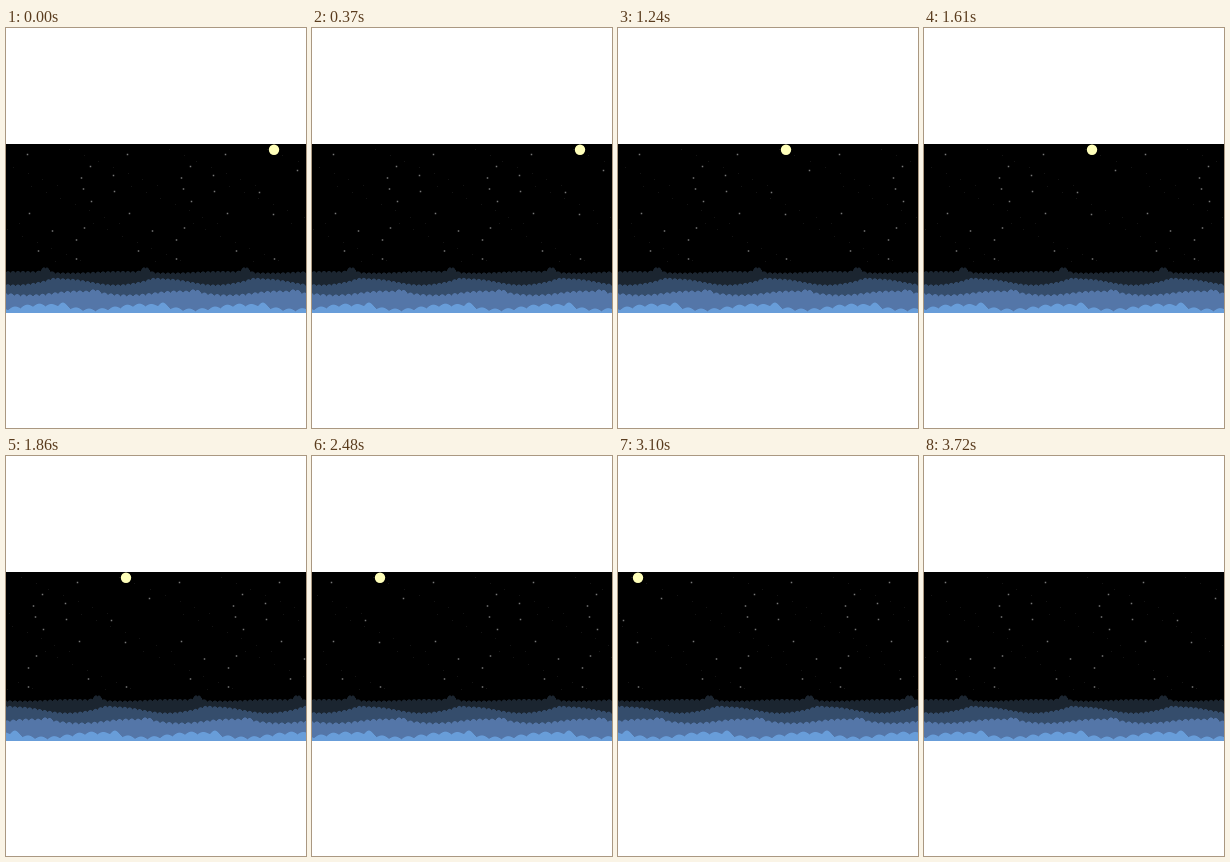
An HTML page with a canvas for the animation above (4340 ms loop, 300 px wide and 400 px high).

```html
<!DOCTYPE html>
<html lang="en">
<head>
<meta charset="utf-8">
<title>Night sky</title>
<style>
html, body { margin: 0; width: 100%; height: 100%; overflow: hidden; background: #fff; }
canvas { display: block; }
</style>
</head>
<body>
<canvas id="stage" width="300" height="400"></canvas>
<script>
const ctx = document.getElementById('stage').getContext('2d');
const STEP = 620, STEPS = 7, TILE = 100, TOP = 116, BOTTOM = 285;
const MOON_TILE = 2;

// Star positions relative to the hilltop x of their tile.
const commonStars = [[-18, 126], [-16, 185], [-7, 222.5], [31, 230.5]];
const denseStars = [[45, 138], [36, 149.5], [68, 147], [38, 160.5], [69, 163],
  [46, 173], [7, 202.5], [39, 199.5], [31, 211.5]];
const sparseStars = [[54, 142], [16, 164], [30, 186]];

// Each ridge is a wave with one hill and a row of small round bumps.
const ridges = [
  { color: '#1b2530', base: 245.2, wave: 0.8, crest: -25, hill: 5, hillX: 0, hillW: 5, bump: 1.5, bumpW: 5 },
  { color: '#354d6c', base: 255, wave: 3, crest: 20, hill: 1.5, hillX: 8, hillW: 7, bump: 1.5, bumpW: 5 },
  { color: '#5476a8', base: 266.5, wave: 2, crest: 33, hill: 2.5, hillX: 50, hillW: 5, bump: 2, bumpW: 6.25 },
  { color: '#689dd9', base: 280.8, wave: 2.5, crest: -3, hill: 3, hillX: 17, hillW: 5, bump: 2.7, bumpW: 12.5 }
];

// Every step moves the row of tiles by half a tile, slightly less on odd steps.
const scroll = step => TILE / 2 * step - 39 - step % 2 * 2;

function ridgeHeight(r, x) {
  const fromHill = x - r.hillX - TILE * Math.round((x - r.hillX) / TILE);
  return r.base
    - r.wave * Math.cos(2 * Math.PI * (x - r.crest) / TILE)
    - r.hill * Math.exp(-((fromHill / r.hillW) ** 2))
    - r.bump * Math.abs(Math.sin(Math.PI * x / r.bumpW));
}

function dot(x, y, size, color) {
  ctx.fillStyle = color;
  ctx.fillRect(x, y, size, size);
}

function drawSky(id, step) {
  const sparse = id % 3 === 2;
  const x = id * TILE - scroll(step) - (sparse ? 2 : 0);
  for (let i = 1; i <= 22; i++) {
    dot(Math.round(x - 50 + i * 61.8 % TILE), Math.round(TOP + 4 + i * 37.3 % 118), 1, '#141414');
  }
  for (const [dx, y] of commonStars.concat(sparse ? sparseStars : denseStars)) {
    dot(x + dx - 0.25, y - 0.25, 1.5, '#777');
  }
  if (id === MOON_TILE) {
    ctx.fillStyle = '#ffffba';
    ctx.beginPath();
    ctx.arc(x + 31, 121.7, 5.2, 0, 2 * Math.PI);
    ctx.fill();
  }
}

function drawRidge(ridge, step) {
  ctx.fillStyle = ridge.color;
  for (let x = 0; x < 300; x++) {
    const y = ridgeHeight(ridge, x + scroll(step));
    ctx.fillRect(x, y, 1, BOTTOM - y);
  }
}

function draw(step) {
  ctx.fillStyle = '#fff';
  ctx.fillRect(0, 0, 300, 400);
  ctx.fillStyle = '#000';
  ctx.fillRect(0, TOP, 300, BOTTOM - TOP);
  const first = step >> 1;
  for (let id = first; id < first + 4; id++) drawSky(id, step);
  for (const ridge of ridges) drawRidge(ridge, step);
}

function tick() {
  draw(Math.floor(performance.now() / STEP) % STEPS);
  requestAnimationFrame(tick);
}
tick();
</script>
</body>
</html>
```
